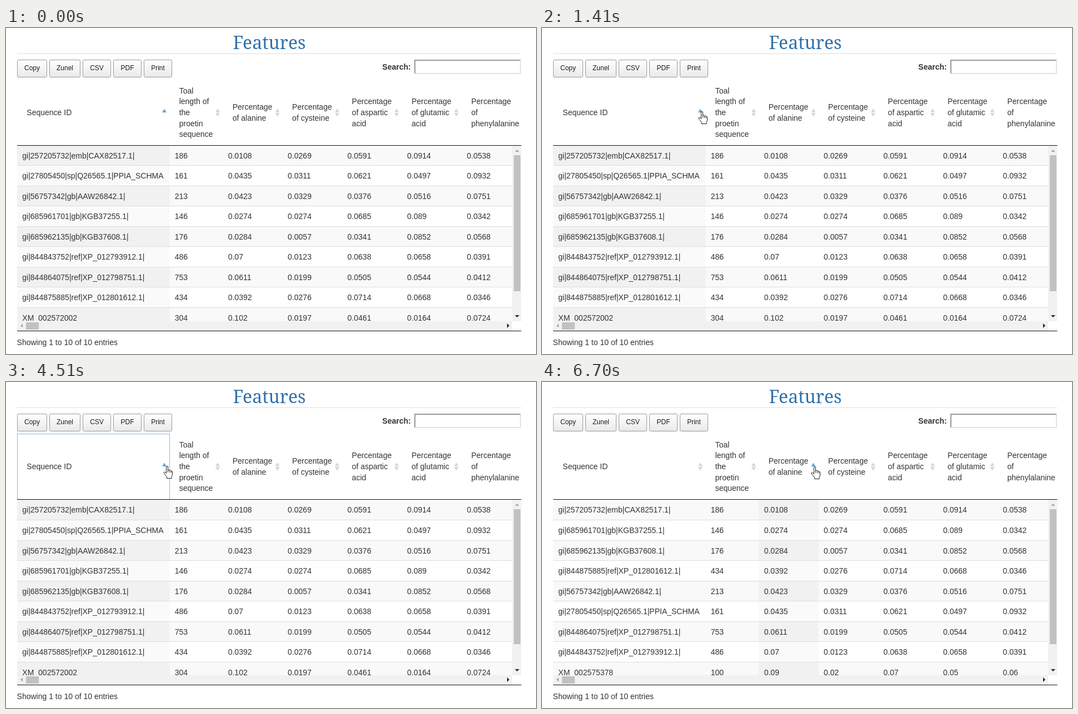
Recreate the animation shown at these times as an HTML page. Size 954 by 587 pixels, loop 8 s.

```html
<!DOCTYPE html>
<html lang="en">
<head>
<meta charset="utf-8">
<title>Features</title>
<style>
  html, body { margin: 0; width: 100%; height: 100%; overflow: hidden; background: #fff; }
  svg { display: block; position: absolute; left: 0; top: 0; }
  text { font: 14px "Liberation Sans", Arial, sans-serif; fill: #333; white-space: pre; }
  .title { font: 32px "Noto Serif", serif; fill: #3071a9; text-anchor: middle; }
  .button { font-size: 12px; fill: #1c1c1c; text-anchor: middle; }
  .bold { font-weight: bold; }
  .pointer path { fill: #fff; stroke: #1a1a1a; stroke-linejoin: round; }
</style>
</head>
<body>
<svg width="954" height="587" viewBox="0 0 954 587">
  <defs>
    <linearGradient id="shade" x2="0" y2="1">
      <stop stop-color="#fff"/><stop offset="1" stop-color="#e9e9e9"/>
    </linearGradient>
    <clipPath id="view"><rect x="20" y="212" width="891" height="316"/></clipPath>
  </defs>
  <g id="page"></g>
  <g id="head"></g>
  <g id="rows" clip-path="url(#view)"></g>
  <g id="bars"></g>
  <rect id="focus" x="20.5" y="93.5" width="274" height="118" fill="none" stroke="#8db4f0"/>
  <g id="lines"></g>
  <g id="arrow" class="pointer">
    <path d="M.5 .5V16.5L4.2 13L6.8 18.5L9 17.5L6.6 12H11.5Z"/>
  </g>
  <g id="hand" class="pointer">
    <path d="M5.5 2Q5.5 .5 7 .5T8.5 2V7.5Q11 6.2 11.5 8.3Q14 7.2 14.3 9.3Q16.5 8.8 16.5 11V15Q16.5 17.5 15 19.5V22.5H6.5V20Q4 17 1.5 13.5Q.2 11.5 1.8 11T5.5 13.5Z"/>
    <path d="M5.5 13.5V8M8.5 7V11.5M11.5 8.5V12M14.3 9.5V12.5" style="fill:none"/>
  </g>
</svg>
<script>
const LOOP = 8000;
const $ = id => document.getElementById(id);

const colX = [19.6, 294, 390, 497.4, 604.9, 712.3, 819.8];
const iconX = [285, 381, 488.5, 596, 703, 810.5];
const heads = [
  "Sequence ID",
  "Toal/length of/the/proetin/sequence",
  "Percentage/of alanine",
  "Percentage/of cysteine",
  "Percentage/of aspartic/acid",
  "Percentage/of glutamic/acid",
  "Percentage/of/phenylalanine"
].map(s => s.split("/"));

const data = `gi|257205732|emb|CAX82517.1| 186 0.0108 0.0269 0.0591 0.0914 0.0538
gi|27805450|sp|Q26565.1|PPIA_SCHMA 161 0.0435 0.0311 0.0621 0.0497 0.0932
gi|56757342|gb|AAW26842.1| 213 0.0423 0.0329 0.0376 0.0516 0.0751
gi|685961701|gb|KGB37255.1| 146 0.0274 0.0274 0.0685 0.089 0.0342
gi|685962135|gb|KGB37608.1| 176 0.0284 0.0057 0.0341 0.0852 0.0568
gi|844843752|ref|XP_012793912.1| 486 0.07 0.0123 0.0638 0.0658 0.0391
gi|844864075|ref|XP_012798751.1| 753 0.0611 0.0199 0.0505 0.0544 0.0412
gi|844875885|ref|XP_012801612.1| 434 0.0392 0.0276 0.0714 0.0668 0.0346
XM_002572002 304 0.102 0.0197 0.0461 0.0164 0.0724
XM_002575378 100 0.09 0.02 0.07 0.05 0.06`.split("\n").map(s => s.split(" "));

// start time, sorted column, direction, extra pixel under the first row
const sorts = [
  [0, 0, 1, 0],
  [3040, 0, -1, 1],
  [4510, 0, 1, 1],
  [6700, 2, 1, 1]
];
const focusSpans = [[3040, 3280], [4510, 5380]];

// time, left, top of the pointer
const path = [
  [230, 588, 472], [370, 570, 466], [440, 510, 448], [500, 450, 425],
  [570, 402, 405], [640, 364, 384], [700, 360, 335], [770, 358, 282],
  [870, 338, 240], [950, 312, 202], [1020, 280, 172], [1100, 263, 160],
  [1180, 268, 158], [1260, 274, 154], [1330, 279, 151], [1410, 281, 150],
  [3040, 283, 151], [4600, 300, 152], [4680, 330, 154], [4760, 362, 156],
  [4840, 388, 156], [5070, 420, 156], [5150, 455, 156], [5220, 474, 155],
  [5380, 476, 154], [5450, 479, 153], [5530, 482, 152], [5680, 484, 152]
];

const rect = (x, y, w, h, fill) =>
  `<rect x="${x}" y="${y}" width="${w}" height="${h}" fill="${fill}"/>`;
const text = (x, y, s, cls = "") => `<text x="${x}" y="${y}" class="${cls}">${s}</text>`;
const shape = (d, fill) => `<path d="${d}" fill="${fill}"/>`;
const upTri = (x, y, fill) => shape(`M${x - 4} ${y + 6}h8l-4 -6.5z`, fill);
const downTri = (x, y, fill) => shape(`M${x - 4} ${y}h8l-4 6.5z`, fill);

function button(label, x, w) {
  return `<rect x="${x + .5}" y="57.5" width="${w - 1}" height="31" rx="2" fill="url(#shade)" stroke="#999"/>`
    + text(x + w / 2, 76, label, "button");
}

function drawPage() {
  $("page").innerHTML = text(474, 38, "Features", "title")
    + rect(20, 45, 907, 2, "#ececec")
    + button("Copy", 20, 54) + button("Zunel", 78, 56) + button("CSV", 138, 51)
    + button("PDF", 193, 51) + button("Print", 248, 51)
    + text(677.3, 75, "Search:", "bold")
    + shape("M735 57H927L925 59H737V81L735 83Z", "#9a9a9a")
    + shape("M927 57V83H735L737 81H925V59Z", "#e4e4e4")
    + text(19.6, 571, "Showing 1 to 10 of 10 entries");
  $("lines").innerHTML = rect(20, 211, 907.5, 1, "#111") + rect(20, 545, 907.5, 1, "#111");
}

function drawHead(col, dir) {
  let out = "";
  heads.forEach((lines, c) => lines.forEach((s, i) => {
    const y = Math.round(157 + (i - (lines.length - 1) / 2) * 19.7);
    out += text(colX[c] + 17.7, y, s);
  }));
  iconX.forEach((x, c) => {
    if (c !== col) out += upTri(x, 145.5, "#d6d6d6") + downTri(x, 153, "#d6d6d6");
    else out += dir > 0 ? upTri(x, 146, "#5fa8dc") : downTri(x, 153, "#5fa8dc");
  });
  $("head").innerHTML = out;
}

function drawRows(col, dir, extra) {
  const list = data.slice();
  if (col) list.sort((a, b) => a[col] - b[col]);
  if (dir < 0) list.reverse();
  let out = "";
  list.slice(0, 9).forEach((cells, i) => {
    const top = i ? Math.floor(212 + 36.5 * i) + extra : 212;
    const odd = i % 2 === 0;
    out += rect(20, top, 891, 38, odd ? "#f9f9f9" : "#fff");
    const left = col ? 390.4 : 20;
    out += rect(left, top, (col ? 497.8 : 294.5) - left, 38, odd ? "#f1f1f1" : "#fafafa");
    if (i) out += rect(20, top - 1, 891, 1, "#ddd");
    const base = Math.floor(235 + 36.5 * i) + (i ? extra : 0);
    cells.forEach((s, c) => out += text(colX[c] + 9.7, base, s));
  });
  $("rows").innerHTML = out;
}

function drawBars(extra) {
  $("bars").innerHTML = rect(911, 212, 16.5, 316, "#f1f1f1")
    + rect(914, 229, 12, 245 - 2 * extra, "#c1c1c1")
    + shape("M916.5 223h7l-3.5 -4z", "#a3a3a3")
    + shape("M916 517h8l-4 4z", "#222")
    + rect(20, 528, 891, 17, "#f1f1f1")
    + rect(36, 530, 23, 13, "#c1c1c1")
    + shape("M30 532.5v7l-4 -3.5z", "#a3a3a3")
    + shape("M902 532v8l4 -4z", "#222");
}

const latest = (steps, t) => steps.filter(s => s[0] <= t).pop();
const show = (el, on) => el.style.display = on ? "" : "none";
let current;

function draw(t) {
  const state = latest(sorts, t);
  if (state !== current) {
    current = state;
    const [, col, dir, extra] = state;
    drawHead(col, dir);
    drawRows(col, dir, extra);
    drawBars(extra);
  }
  show($("focus"), focusSpans.some(([a, b]) => t >= a && t < b));
  const spot = latest(path, t);
  const overHead = spot && spot[2] < 211;
  show($("arrow"), spot && !overHead);
  show($("hand"), overHead);
  if (spot) $(overHead ? "hand" : "arrow").setAttribute("transform", `translate(${spot[1]} ${spot[2]})`);
}

drawPage();
draw(0);
const start = performance.now();
function tick() {
  draw((performance.now() - start) % LOOP);
  requestAnimationFrame(tick);
}
requestAnimationFrame(tick);
</script>
</body>
</html>
```
